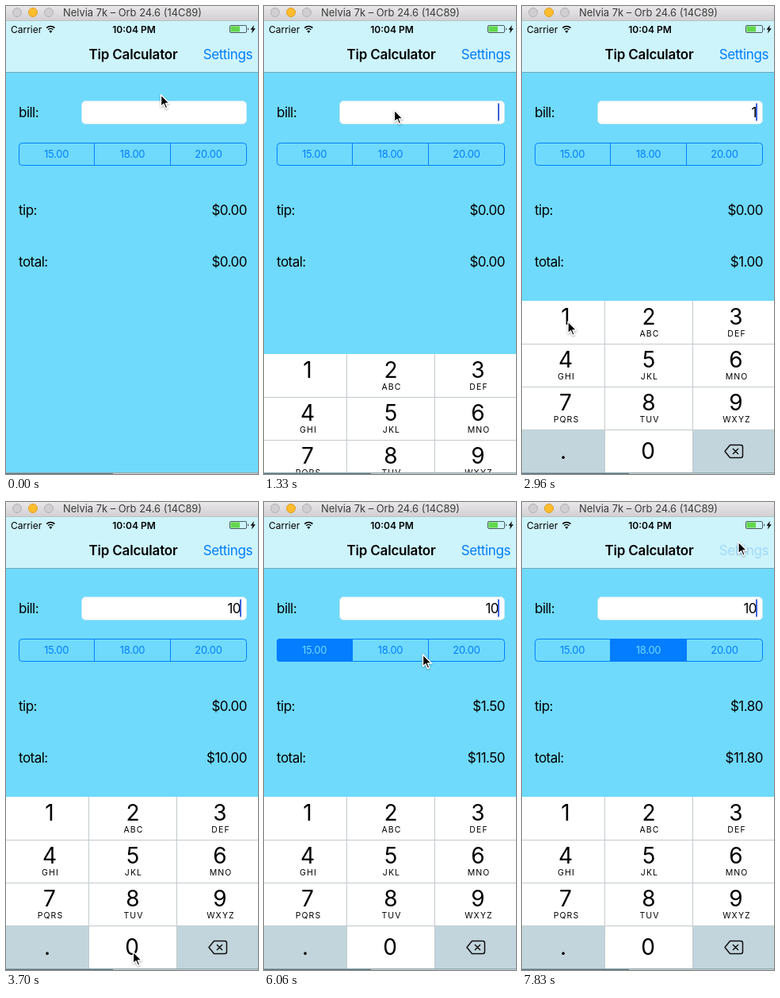
These frames come from a looping animation (318x589 px, 8 s). An HTML page:

```html
<!DOCTYPE html>
<html lang="en">
<head>
<meta charset="utf-8">
<title>Tip Calculator</title>
<style>
html, body { margin: 0; width: 100%; height: 100%; overflow: hidden; }
svg { display: block; width: 318px; height: 589px; background: #6fdafb; }
text { font: 17px Inter, "Open Sans", sans-serif; letter-spacing: -.03em; }
.end { text-anchor: end; }
.mid { text-anchor: middle; }
.blue { fill: #047dff; }
#bar { font-size: 12.9px; letter-spacing: 0; fill: #3c3c3c; }
#title { font-weight: 600; letter-spacing: -.012em; }
#settings { letter-spacing: -.023em; }
.status { font-size: 12px; letter-spacing: 0; }
.clock { font-weight: 600; }
.seg { font-size: 13px; letter-spacing: -.02em; }
.digit { font-size: 28px; letter-spacing: 0; }
.letters { font-size: 10.5px; letter-spacing: 1.1px; }
</style>
</head>
<body>
<svg viewBox="0 0 318 589">
  <defs>
    <linearGradient id="chrome" x2="0" y2="1">
      <stop stop-color="#e9e7e9"/><stop offset="1" stop-color="#d2d0d2"/>
    </linearGradient>
    <clipPath id="screen"><path d="M0 84H318V587H0Z"/></clipPath>
    <clipPath id="pill"><rect x="16" y="172" width="288" height="29" rx="4"/></clipPath>
  </defs>

  <rect y="18" width="318" height="65" fill="#cdf4fb"/>
  <path d="M0 83.5H318" stroke="#6fa9b9"/>
  <rect width="318" height="18" fill="url(#chrome)"/>
  <path d="M0 18.5H318" stroke="#b9c3c6"/>
  <g fill="#d0ced0" stroke="#b4b2b4">
    <circle cx="14" cy="8" r="5.5"/>
    <circle cx="34" cy="8" r="5.5" fill="#fdbc2e" stroke="#dfa023"/>
    <circle cx="54" cy="8" r="5.5"/>
  </g>
  <text id="bar" x="72" y="13">Nelvia 7k – Orb 24.6 (14C89)</text>

  <text class="status" x="6" y="33.5">Carrier</text>
  <g fill="none" stroke="#000" stroke-width="1.6">
    <path d="M51.2 27.6a7.2 7.2 0 0 1 10.2 0M53.2 29.8a4.4 4.4 0 0 1 6.2 0"/>
    <path d="M56.3 34l-1.9-2.2a2.7 2.7 0 0 1 3.8 0z" fill="#000" stroke="none"/>
  </g>
  <text class="status clock mid" x="161.5" y="33.5">10:04 PM</text>
  <rect x="282.5" y="24.5" width="21" height="9" rx="1.5" fill="none" stroke="#4b5b5e"/>
  <rect x="283.5" y="25.5" width="11.5" height="7" fill="#63d84c"/>
  <path d="M305 27.5v3q1.3-.4 1.3-1.5t-1.3-1.5z" fill="#4b5b5e"/>
  <path d="M313 24l-4.5 5.8h2.6L310 34.5l4.8-6.2h-2.7z"/>

  <text id="title" class="mid" x="160.5" y="67">Tip Calculator</text>
  <text id="settings" class="blue end" x="311" y="67">Settings</text>

  <text x="16" y="140">bill:</text>
  <rect x="95.5" y="119.5" width="208" height="29" rx="5" fill="#fff" stroke="#c5e6f1"/>
  <text id="bill" class="end" x="296" y="140"></text>
  <path id="caret" d="M296 122.5V144.5" stroke="#3f62d8" stroke-width="2"/>

  <rect id="chosen" class="blue" y="172" width="96" height="29" clip-path="url(#pill)"/>
  <g fill="none" stroke="#047dff">
    <rect x="16.5" y="172.5" width="287" height="28" rx="4"/>
    <path d="M111.5 172V201M207.5 172V201"/>
  </g>
  <g id="segs"></g>

  <text x="16" y="263">tip:</text>
  <text id="tip" class="end" x="304" y="263"></text>
  <text x="16" y="328">total:</text>
  <text id="total" class="end" x="304" y="328"></text>

  <g clip-path="url(#screen)"><g id="pad"></g></g>
  <path d="M0 587.5H318" stroke="#8fa9b1"/>
  <path d="M0 588.5H318" stroke="#c8cccd"/>
  <path d="M0 588.5H135" stroke="#60757c"/>

  <g id="cursor">
    <path d="M0 0V15L3.5 11.8L6 17.5L8.4 16.5L6 11H10.8Z" stroke="#fff" stroke-width="1.4" stroke-linejoin="round"
      style="filter:drop-shadow(0 1px 1px #0005)"/>
  </g>
</svg>
<script>
const $ = id => document.getElementById(id);
const LOOP = 8000, STEP = 147.8, LAST = 53;
const rates = [15, 18, 20];

// Cursor path: step, x, y
const path = [
  [0, 195.5, 111.5], [3, 147, 127], [5, 164.5, 131], [9, 164.5, 131], [13, 168, 140], [16, 168, 140],
  [19, 58, 397], [20, 58, 397], [23, 160, 567], [25, 160.5, 566], [29, 160, 560], [32, 157, 440],
  [35, 108, 187], [36, 75, 187], [37, 75, 187], [41, 200.5, 192], [43, 166, 187],
  [47, 166, 187], [52, 273, 50], [53, 273, 50]
];

$('segs').innerHTML = rates.map((r, i) =>
  `<text class="seg mid blue" x="${63.5 + 96 * i}" y="191">${r.toFixed(2)}</text>`).join('');

// Keypad, drawn from its own top edge
const colX = [0, 105, 216, 318], midX = [55, 160, 270];
const letters = ['', 'ABC', 'DEF', 'GHI', 'JKL', 'MNO', 'PQRS', 'TUV', 'WXYZ'];
const GREY = '#c2d5dd';
const keys = [...'123456789.0<'];
$('pad').innerHTML = keys.map((key, i) => {
  const c = i % 3, y = 54 * (i / 3 | 0), x = midX[c];
  const face = `<rect id="key${i}" x="${colX[c]}" y="${y}" width="${colX[c + 1] - colX[c]}" height="54" fill="${'.<'.includes(key) ? GREY : '#fff'}"/>`;
  if (key === '<') return face +
    `<path d="M262.5 181.5H276q2.5 0 2.5 2.5V195q0 2.5-2.5 2.5H262.5L256 189.5ZM266 186l7 7M273 186l-7 7"
      fill="none" stroke="#111" stroke-width="1.5" stroke-linejoin="round"/>`;
  const dx = key === '.' ? -3 : key === '0' ? -1 : 0;
  return face + `<text class="digit mid" x="${x + dx}" y="${y + (i > 8 ? 36.5 : 30)}">${key}</text>` +
    `<text class="letters mid" x="${x + 1}" y="${y + 45}">${letters[i] || ''}</text>`;
}).join('') +
  '<path d="M104.5 0V216M215.5 0V216M0 54.5H318M0 108.5H318M0 162.5H318" stroke="#c3cacd"/>';

const clamp = v => Math.max(0, Math.min(1, v));

function cursorAt(k) {
  const n = Math.max(1, path.findIndex(p => p[0] >= k));
  const [k0, x0, y0] = path[n - 1], [k1, x1, y1] = path[n];
  const u = (k - k0) / (k1 - k0);
  return [x0 + (x1 - x0) * u, y0 + (y1 - y0) * u];
}

// The blink restarts after each typed digit
function caretAt(k) {
  if (k < 9) return 0;
  const since = k < 20 ? 9 : k < 25 ? 20 : 25;
  const phase = (k - since) * STEP / 1000 % 1;
  return phase < .7 ? clamp((.58 - phase) / .2) : clamp((phase - .78) / .15);
}

function draw(t) {
  const k = Math.min(LAST, Math.floor((t + 5) / STEP));
  const bill = k < 20 ? '' : k < 25 ? '1' : '10';
  const choice = k < 37 ? -1 : k < 44 ? 0 : 1;
  const tip = choice < 0 ? 0 : bill * rates[choice] / 100;

  $('cursor').setAttribute('transform', `translate(${cursorAt(k)})`);
  $('caret').setAttribute('opacity', caretAt(k));
  $('bill').textContent = bill;
  $('tip').textContent = '$' + tip.toFixed(2);
  $('total').textContent = '$' + (+bill + tip).toFixed(2);

  $('chosen').setAttribute('x', 16 + 96 * choice);
  $('chosen').setAttribute('opacity', choice < 0 ? 0 : 1);
  [...$('segs').children].forEach((s, i) => s.style.fill = i === choice ? '#6fdafb' : '');

  const drop = k < 9 ? 216 : k === 9 ? 67 : k === 10 ? 8 : 0;
  $('pad').setAttribute('transform', `translate(0 ${371 + drop})`);
  $('key0').setAttribute('fill', k === 19 ? GREY : '#fff');
  $('key10').setAttribute('fill', k === 24 ? GREY : '#fff');
  $('settings').setAttribute('opacity', k === LAST ? .22 : 1);
}

const start = performance.now();
(function tick() {
  draw((performance.now() - start) % LOOP);
  requestAnimationFrame(tick);
})();
</script>
</body>
</html>
```
